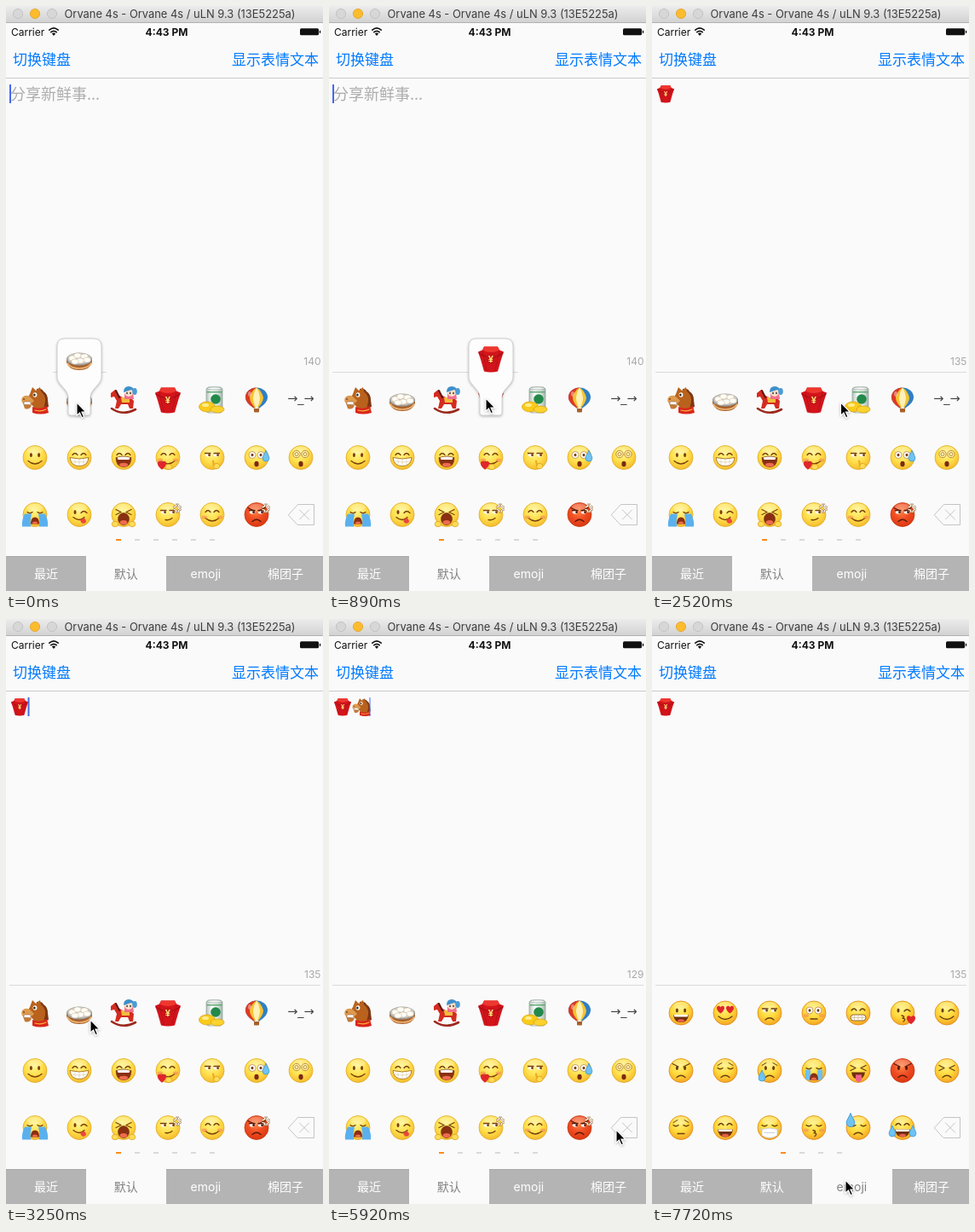
Recreate the animation shown at these times as an HTML page. Size 372x686 px, loop 8000 ms.

```html
<!DOCTYPE html>
<html lang="zh-CN">
<head>
<meta charset="utf-8">
<title>Emoticon keyboard</title>
<style>
  html, body { margin: 0; width: 100%; height: 100%; overflow: hidden; background: #fafafa; }
  svg { display: block; width: 372px; height: 686px; }
  text { font-family: Inter, "Noto Sans CJK SC", "Noto Sans CJK", sans-serif; }
  .zh { font-family: "Noto Sans CJK SC", "Noto Sans CJK", sans-serif; }
</style>
</head>
<body>
<svg id="stage" viewBox="0 0 372 686" xmlns="http://www.w3.org/2000/svg"></svg>
<script>
const LOOP = 8000, TICK = 148;
const INSERT_1 = 1930, INSERT_2 = 4440, REMOVE = 6070, SWITCH = 7570;
const COLS = [34, 86, 138, 190, 242, 294, 346], ROWS = [462, 529.5, 596.5];
const INK = 'currentColor';

// Drawing helpers
const line = (d, c = INK, w = 1.3) =>
  `<path d="${d}" fill="none" stroke="${c}" stroke-width="${w}" stroke-linecap="round" stroke-linejoin="round"/>`;
const area = (d, c, extra = '') => `<path d="${d}" fill="${c}" ${extra}/>`;
const oval = (x, y, rx, ry, c, extra = '') =>
  `<ellipse cx="${x}" cy="${y}" rx="${rx}" ry="${ry}" fill="${c}" ${extra}/>`;
const rect = (x, y, w, h, c, extra = '') =>
  `<rect x="${x}" y="${y}" width="${w}" height="${h}" fill="${c}" ${extra}/>`;
const text = (s, x, y, size, c, extra = '') =>
  `<text x="${x}" y="${y}" font-size="${size}" fill="${c}" ${extra}>${s}</text>`;
const group = (s, x, y, scale = 1) => `<g transform="translate(${x} ${y}) scale(${scale})">${s}</g>`;
const edge = (c, w = .7) => `stroke="${c}" stroke-width="${w}"`;
const pair = (fn, d = 5) => fn(-d) + fn(d);
const heart = (x, y, s) => group(area('M0 4C-7-1-3-6 0-2.5C3-6 7-1 0 4z', '#e0262b'), x, y, s);
const drop = (x, y, s) =>
  group(area('M0-5C1-2 3 0 3 2a3 3 0 0 1-6 0C-3 0-1-2 0-5z', '#6fc3f2', edge('#3a98d6', .6)), x, y, s);
const hand = (x, y) => oval(x, y, 3.8, 3.2, '#ffdc55', edge('#d89a1e'));

// Face features, centred on 0,0 with a radius of about 14
const F = {
  dots: pair(x => oval(x, -3, 1.5, 2.6, INK), 4.6),
  happy: line('M-8-3q3-4 6 0M2-3q3-4 6 0'),
  shut: line('M-9-3q3 2.6 6 0M3-3q3 2.6 6 0'),
  squeeze: line('M-9-6l6 3-6 3M9-6l-6 3 6 3'),
  side: pair(x => oval(x, -3, 3.2, 2, '#fff') + oval(x + 1.6, -3, 1.4, 1.6, INK)) + line('M-8.5-5h6.5M2-5h6.5'),
  wide: pair(x => oval(x, -3, 4, 4, '#fff', edge('#a8651b', .6)) + oval(x, -3, 1.5, 1.7, INK)),
  swirl: pair(x => oval(x, -4, 4.2, 4.2, '#fff3b0', edge('#b88224', .9)) + oval(x, -4, 2, 2, 'none', edge('#a87420', .8))),
  hearts: pair(x => heart(x, -4, 1.15), 5.5),
  wink: oval(-5, -3, 1.5, 2.5, INK) + line('M2-2q3-4 7 0'),
  mad: line('M-10-8l7 3.5M10-8l-7 3.5'),
  sad: line('M-9-6l5-3M9-6l-5-3', INK, 1),
  smile: line('M-8 4q8 7 16 0'),
  smirk: line('M-3 6q5 1 8-2'),
  frown: line('M-5 8q5-4.5 10 0'),
  flat: line('M-4 7h8'),
  open: area('M-9 2h18q-1 9-9 9T-9 2z', '#70300f') + oval(0, 9, 4, 1.8, '#e8604c') + area('M-8.5 2h17l-1 2.6h-15z', '#fff'),
  roar: area('M-9 0q9-3 18 0q0 11-9 11T-9 0z', '#8a2f12', edge('#7a3f0c')) + oval(0, 8.5, 5, 2.3, '#ee6a50') +
    area('M-7.5 0q7.5-2 15 0l-1 2.6h-13z', '#fff'),
  teeth: rect(-9, 2, 18, 7, '#fff', `rx="3.5" ${edge('#8a5518', .9)}`) + line('M-8.5 5.5h17M-4.5 2.5v6M0 2.5v6M4.5 2.5v6', '#c9b78e', .7),
  grin: area('M-11 0q11 3 22 0q-1 10-11 10T-11 0z', '#fff', edge('#a8701c', .9)) +
    line('M-10 4q10 3 20 0M-5 1.5v7M0 2v8M5 1.5v7', '#d6c69c', .6),
  oh: oval(0, 7.5, 2.6, 3.2, '#7b2a12'),
  wail: area('M-5 11q0-8 5-8t5 8z', '#8a2f12') + oval(0, 9.5, 3, 1.6, '#ee6a50'),
  yawn: oval(0, 5, 6.5, 7, '#8a2f12', edge('#7a3f0c')) + oval(0, 9, 4.3, 2.6, '#ee6a50'),
  kiss: line('M-1 3q5 1 1 3q5 1 1 4'),
  tongue: area('M-8 2h16q-1 8-8 8T-8 2z', '#70300f') + area('M-3 5h7v6q-3.5 5-7 0z', '#f0628c'),
  lick: line('M-7 3q7 6 13 0') + area('M1 6l5-2q4 5 0 6t-5-4z', '#e9483c'),
  blush: pair(x => oval(x, 3, 3.2, 2, '#f58b5a', 'opacity=".6"'), 9),
  love: heart(-7, 9, 1.3) + hand(1, 11),
  blow: heart(10, 8, 1.3),
  finger: hand(5, 10) + line('M2 9l-1-5', '#eda928', 2.2),
  sweat: drop(11, -2, 1.3),
  bead: drop(-9, -9, 1.6),
  tear: drop(-9, 6, 1.3),
  joy: drop(-12, 4, 1.3) + drop(12, 4, 1.3),
  streams: area('M-10-1h6v13l-6-2zM4-1h6v11l-6 2z', '#6cc0f2'),
  flood: area('M-12-1h8q-2 7-1 15h-10q-1-7 3-15zM12-1h-8q2 7 1 15h10q1-7-3-15z', '#5ab0ee'),
  hands: hand(-10, 11) + hand(10, 11),
  mark: line('M7-9q3 0 3-3M12-12q0 3 3 3M15-6q-3 0-3 3M10-3q0-3-3-3', '#8a5a20', 2) +
    line('M7-9q3 0 3-3M12-12q0 3 3 3M15-6q-3 0-3 3M10-3q0-3-3-3', '#fff', 1.2),
  mask: area('M-9 2q9-3 18 0v7q-9 6-18 0z', '#fff', edge('#c3ccd4', .8)) + line('M-9 3l-4-3M9 3l4-3M-6 6h12', '#c3ccd4', .9),
};
const TONES = { soft: ['#dfab2a', '#7a3f0c'], gloss: ['#dc8a1c', '#6a3d14'], red: ['#c43a14', '#571a08'] };
const face = (tone, names) => `<g color="${TONES[tone][1]}">` +
  oval(0, 0, 14, 14, `url(#${tone})`, edge(TONES[tone][0], .8)) +
  oval(0, -8.5, 9, 4.5, '#fff', 'opacity=".25"') +
  names.split(' ').map(n => F[n]).join('') + '</g>';

const ICONS = {
  horse: area('M2-13q6-1 8 3q5 3 5 10l1 8-8 3-6-14z', '#7c3712') +
    area('M-3-15l4 4 5-4 1 5q6 5 5 12l-2 9H-1q0-4-4-6l-6-3 5-9z', '#b9621d') +
    area('M-15-3q4-4 9-1l5 5-4 4-9-1q-3-3-1-7z', '#dd9a50') +
    area('M-14 4l10 2q-2 6-8 4z', '#c47a36') + rect(-13, 2, 8, 3.4, '#fff', `rx="1" ${edge('#84502a', .5)}`) +
    oval(0, -6, 2.4, 2.8, '#fff') + oval(-.6, -6, 1.2, 1.6, '#221') + oval(-13, -1, .8, 1, '#6b3513') +
    area('M-3 8q9 4 17-1l2 8q-10 3-19 0z', '#d9261c') + line('M0 12q7 2 13-1', '#f3b43a', 1.2),
  buns: area('M-15-1v5q3 9 15 9t15-9v-5z', '#a9622c') + line('M-14 5q4 6 14 6t14-6', '#f0b878', 1.6) +
    oval(0, 0, 15, 7.6, '#989fa2') + oval(0, -.6, 13.6, 6.4, '#d6cabb') +
    [[-8, -1], [-2, -4], [6, -3], [9, 1], [1, 2], [-5, 3]].map(([x, y]) =>
      oval(x, y, 4.2, 3, '#fffdf5', edge('#c9bda8', .6))).join(''),
  rocker: line('M-14 10q13 9 28 1', '#9c2a1c', 2.6) +
    area('M-15-8l5-4 4 6q6 5 14 3l4 4-1 9h-4l-2-5h-8l-3 5h-4l2-9-3-5-4 1z', '#d42b20') +
    line('M-9-11l4 8', '#5a1710', 2) + area('M-3-3h10v6h-9z', '#f2bd3c') +
    area('M1-8h10l1 7H1z', '#ef6f8d') + oval(6, -9, 5, 5, '#ffe0c8') +
    area('M0-9q0-7 6-7t7 7l-4-3z', '#3f8fcb') + oval(13, -10, 2.8, 4, '#4c9cd4') +
    oval(4, -8, .8, 1.2, '#333') + oval(8, -8, .8, 1.2, '#333'),
  packet: area('M-8-14.5H8l2 4 5 2-3 9-4 14q-8 2-16 0l-4-14-3-9 5-2z', '#d3141b') +
    area('M-8-14.5H8l2 4q-10 5-20 0z', '#ee372f') + line('M-14-7q14 10 28 0', '#a00e15', 1.1) +
    line('M-10-9l5 22M10-9l-5 22', '#b01019', .8) + oval(0, 0, 5.6, 5.6, '#c4141a') +
    text('¥', 0, 4, 11, '#ffdf7a', 'text-anchor="middle" font-weight="700"'),
  can: area('M-7-13l2-2H10l2 2v26l-2 2H-5l-2-2z', 'url(#tin)', edge('#8fa097')) +
    oval(2.5, -13.5, 8.4, 1.7, '#eef2f0', edge('#8c9992', .6)) + rect(-6.5, -10, 18, 1.4, '#59a86c') +
    oval(4, -1, 5.8, 5.8, '#23894a') +
    oval(-6, 8, 9.5, 6, '#f9cb1b', edge('#d39c12')) + oval(6, 11, 8, 4, '#fbd22e', edge('#d39c12')) +
    oval(-8, 6, 4, 2, '#ffec8c'),
  balloon: line('M-4 7l2 5M4 7l-2 5', '#8c5a2a', .9) + rect(-3, 10, 6, 4.5, '#a9602a', 'rx="1"') +
    area('M-4 9q-9-6-9-12a13 11.5 0 0 1 26 0q0 6-9 12z', '#2f7fc4') +
    area('M-4 9q-9-6-9-12a13 11.5 0 0 1 13-11.5q-5 9 0 23.5z', '#dd3a22') +
    area('M-2 9q-6-7-6-12q2-8 8-11.5q6 3.500 8 11.500q0 5-6 12z', '#f6c431') +
    area('M-1 9q-3-7-3-12q1-7 4-11.500q3 4.500 4 11.500q0 5-3 12z', '#fdf0b8') +
    oval(-8, -7, 2, 3, '#fff', 'opacity=".4"'),
  look: text('→_→', 0, 2.5, 14.5, '#444', 'text-anchor="middle" style="font-family:\'DejaVu Sans\',sans-serif"'),
};

const place = (icons) => icons.map((s, i) => group(s, COLS[i % 7], ROWS[Math.floor(i / 7)])).join('');
const dashes = (start, n) => Array.from({ length: n }, (_, i) =>
  rect(start + 22 * i, 625, 6, 2, i ? '#d9d9d9' : '#ff8b1a')).join('');
const FIRST = Object.values(ICONS);
const CARTOON = ['dots smile', 'happy grin', 'happy roar', 'happy smile blush love', 'side finger',
  'wide oh sweat', 'swirl oh', 'shut flood wail', 'wink lick', 'squeeze yawn hands', 'side smirk mark',
  'happy smile blush'];
const EMOJI = ['dots open', 'hearts smile', 'side frown', 'wide blush flat', 'happy teeth', 'wink kiss blow',
  'wink smile', 'dots mad frown', 'shut sad frown', 'dots sad frown tear', 'shut streams wail', 'squeeze tongue',
  'dots mad frown', 'squeeze frown', 'shut sad flat', 'happy open', 'shut mask', 'shut kiss blush',
  'shut frown bead', 'happy open joy'];
const page1 = place([...FIRST, ...CARTOON.map(n => face('soft', n)), face('red', 'side mad frown mark')]) + dashes(129, 6);
const page2 = place(EMOJI.map((n, i) => face(i === 12 ? 'red' : 'gloss', n))) + dashes(151, 4);

const tabs = (active) => rect(0, 645, 372, 41, '#b4b4b4') + rect(0, 645, 372, 1, '#a8a8a8') +
  rect(94 * active, 645, 94, 41, '#fafafa') +
  ['最近', '默认', 'emoji', '棉团子'].map((s, i) =>
    text(s, 47 + 93.7 * i, 671, 14, i === active ? '#828282' : '#fff', 'text-anchor="middle"')).join('');

const stops = (colours) => colours.map((c, i) =>
  `<stop offset="${i / (colours.length - 1)}" stop-color="${c}"/>`).join('');
const ball = (id, ...colours) =>
  `<radialGradient id="${id}" cx=".45" cy=".35" r=".7">${stops(colours)}</radialGradient>`;
const ramp = (id, x, y, ...colours) => `<linearGradient id="${id}" x2="${x}" y2="${y}">${stops(colours)}</linearGradient>`;
const light = (x, c, rim) => oval(x, 9, 5.6, 5.6, c, edge(rim, .8));
const POPUP = 'M-26 399q0-9 9-9h34q9 0 9 9v36c0 9-13 14-13 24v18q0 3-3 3h-20q-3 0-3-3v-18c0-10-13-15-13-24z';

document.getElementById('stage').innerHTML = `
<defs>
  ${ball('soft', '#fff48c', '#ffe04d', '#f3b526')}
  ${ball('gloss', '#fff07a', '#ffd93b', '#f39d1f')}
  ${ball('red', '#ff8444', '#ef4c22', '#d8350f')}
  ${ramp('tin', 1, 0, '#b4c2ba', '#fbfdfc', '#e2eae6', '#a3b3aa')}
  ${ramp('bar', 0, 1, '#ececec', '#d1d1d1')}
  <filter id="shade" x="-30%" y="-20%" width="160%" height="140%">
    <feDropShadow dx="0" dy="1" stdDeviation="1.4" flood-color="#000" flood-opacity=".3"/>
  </filter>
</defs>
${rect(0, 0, 372, 686, '#fafafa')}
${rect(0, 0, 372, 20, 'url(#bar)')}${rect(0, 19, 372, 1, '#b1b1b1')}
${light(14, '#d7d7d7', '#bdbdbd')}${light(34, '#fdbc2e', '#e0a023')}${light(54, '#d7d7d7', '#bdbdbd')}
${text('Orvane 4s - Orvane 4s / uLN 9.3 (13E5225a)', 204, 14, 12.9, '#3d3d3d', 'text-anchor="middle"')}
${text('Carrier', 6, 34.5, 12, '#111')}
${line('M50.8 28.2q5.2-4.6 10.4 0M52.8 30.7q3.2-2.8 6.4 0', '#111', 1.6)}${area('M53.8 32.3q2.2-1.6 4.4 0L56 35z', '#111')}
${text('4:43 PM', 188.5, 34.5, 12, '#111', 'text-anchor="middle" font-weight="700"')}
${rect(345, 26.3, 22, 8, '#111', 'rx="1.5"')}${rect(367.8, 28.8, 1.4, 3, '#111')}
${text('切换键盘', 8, 68.5, 17, '#007aff', 'class="zh"')}
${text('显示表情文本', 367, 68.5, 17, '#007aff', 'class="zh" text-anchor="end"')}
${rect(0, 84, 372, 1, '#cacaca')}
<g id="hint">${text('分享新鲜事...', 5, 109.5, 18, '#adadad', 'class="zh"')}</g>
<g id="typed1">${group(ICONS.packet, 16, 103, .67)}</g>
<g id="typed2">${group(ICONS.horse, 38, 103, .67)}</g>
<rect id="caret" y="92" width="2" height="22" fill="#4467ef"/>
<text id="count" x="369.5" y="421" font-size="12" fill="#a8a8a8" text-anchor="end"></text>
<rect id="rule" y="429" height="1" fill="#d9d9d9"/>
<g id="page1">${page1}${tabs(1)}</g>
<g id="page2">${page2}${tabs(2)}</g>
${line('M331.5 596.5l11-12h19v24h-19z', '#c4c4c4', 1)}${line('M344.5 591l11 11M355.5 591l-11 11', '#c4c4c4', 1)}
<g id="popup"><path d="${POPUP}" fill="#fdfdfd" stroke="#b4b4b4" stroke-width=".6" filter="url(#shade)"/>
  ${[1, 2, 3].map(i => `<g id="pop${i}">${group(FIRST[i], 0, 414)}</g>`).join('')}</g>
<g id="pointer">${area('M0 0V15.2l3.500-3.300 2.600 5.800 2.400-1-2.600-5.700h4.900z', '#000', edge('#fff', 1.1) + ' filter="url(#shade)"')}</g>`;

// Pointer path: time, x, y
const PATH = [[0, 83, 465], [444, 134, 462], [592, 134, 462], [740, 150, 461], [888, 184, 460], [1776, 184, 460],
  [1924, 214, 435], [2220, 222, 462], [2812, 221, 468], [2960, 205, 476], [3108, 141, 476], [3256, 99, 470],
  [3552, 45, 467], [3996, 30, 466], [4736, 30, 466], [5032, 110, 505], [5328, 290, 585], [5624, 337, 599],
  [6364, 337, 599], [6660, 310, 615], [7104, 227, 658], [LOOP, 227, 658]];

function pointerAt(t) {
  const s = Math.min(LOOP, Math.floor((t + 10) / TICK) * TICK);
  const i = Math.max(1, PATH.findIndex(p => p[0] >= s));
  const [a, b] = [PATH[i - 1], PATH[i]], k = (s - a[0]) / (b[0] - a[0]);
  return [a[1] + (b[1] - a[1]) * k, a[2] + (b[2] - a[2]) * k];
}

// The blink restarts after every edit
function caretAlpha(t) {
  const start = [REMOVE, INSERT_2, INSERT_1].find(e => t >= e) ?? -150;
  const p = (t - start) % 1040;
  return p < 440 ? 1 : p < 590 ? .5 : p < 890 ? 0 : .5;
}

const el = id => document.getElementById(id);
const show = (id, on) => el(id).setAttribute('display', on ? 'inline' : 'none');
const set = (id, attrs) => { for (const k in attrs) el(id).setAttribute(k, attrs[k]); };

function render(t) {
  const first = t >= INSERT_1, second = t >= INSERT_2 && t < REMOVE;
  const pop = t < 300 ? 1 : t < 890 ? 2 : first ? 0 : 3;
  const [left, right] = t < 150 ? [55, 118] : t < 890 ? [4, 170] : first ? [4, 369] : [4, 222];
  show('hint', !first);
  show('typed1', first);
  show('typed2', second);
  show('page1', t < SWITCH);
  show('page2', t >= SWITCH);
  show('popup', pop);
  [1, 2, 3].forEach(i => show('pop' + i, i === pop));
  if (pop) set('popup', { transform: `translate(${COLS[pop]} 0)` });
  set('rule', { x: left, width: right - left });
  set('caret', { x: second ? 47 : first ? 25.5 : 4, opacity: caretAlpha(t) });
  el('count').textContent = second ? 129 : first ? 135 : 140;
  set('pointer', { transform: `translate(${pointerAt(t).join(' ')})` });
}

const begin = performance.now();
function tick() {
  render((performance.now() - begin) % LOOP);
  requestAnimationFrame(tick);
}
tick();
</script>
</body>
</html>
```
